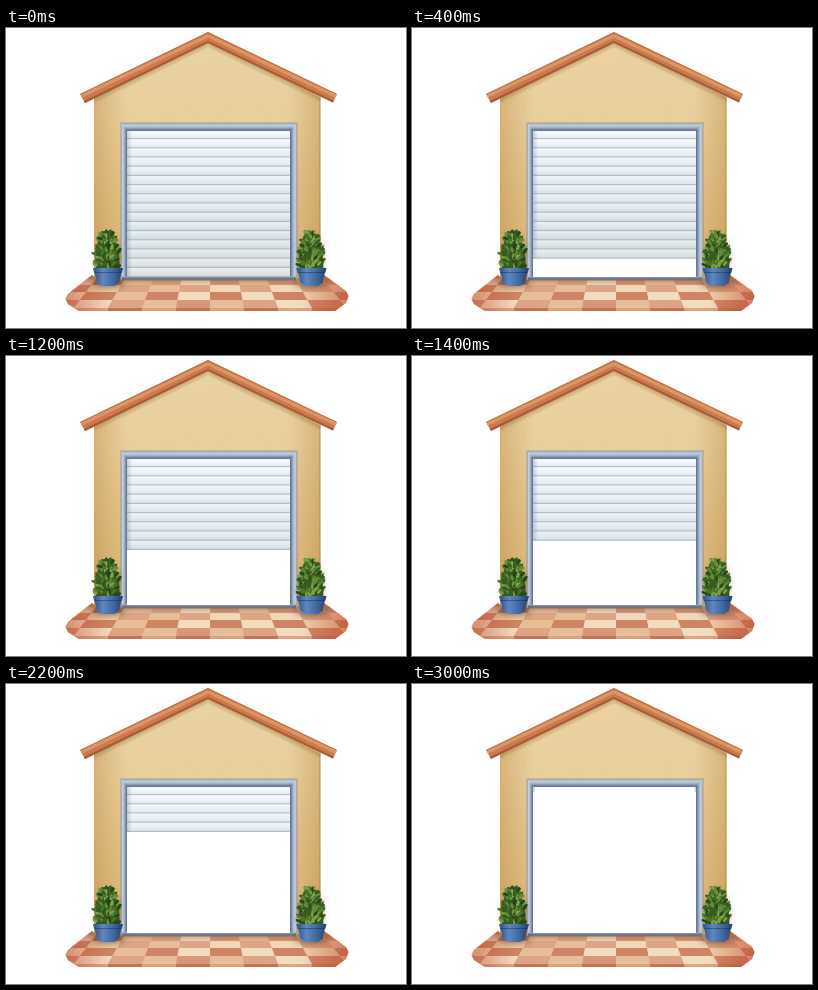
An HTML page with a canvas that plays this animation: 400 px wide and 300 px high, repeating every 3200 ms.

```html
<!DOCTYPE html>
<html lang="en">
<head>
<meta charset="utf-8">
<title>Garage door</title>
<style>
html, body { margin: 0; width: 100%; height: 100%; overflow: hidden; background: #fff; }
canvas { display: block; }
</style>
</head>
<body>
<canvas id="stage" width="400" height="300"></canvas>
<script>
const ctx = document.getElementById('stage').getContext('2d');
const LOOP = 3200, STEP = 200, SLAT = 9.2;
const DOOR = { x: 121, y: 102, w: 163, bottom: 249 };

let seed = 7;
const rnd = () => (seed = seed * 16807 % 2147483647) / 2147483647;
const pick = list => list[Math.floor(rnd() * list.length)];

function gradient(x0, y0, x1, y1, ...colors) {
  const g = ctx.createLinearGradient(x0, y0, x1, y1);
  colors.forEach((c, i) => g.addColorStop(i / (colors.length - 1), c));
  return g;
}

function rect(fill, x, y, w, h) {
  ctx.fillStyle = fill;
  ctx.fillRect(x, y, w, h);
}

function path(...p) {
  ctx.beginPath();
  for (let i = 0; i < p.length; i += 2) ctx.lineTo(p[i], p[i + 1]);
}

function poly(fill, ...p) {
  path(...p);
  ctx.closePath();
  ctx.fillStyle = fill;
  ctx.fill();
}

function stroke(color, width, ...p) {
  path(...p);
  ctx.strokeStyle = color;
  ctx.lineWidth = width;
  ctx.stroke();
}

function oval(fill, x, y, rx, ry) {
  ctx.fillStyle = fill;
  ctx.beginPath();
  ctx.ellipse(x, y, rx, ry, 0, 0, 7);
  ctx.fill();
}

function drawWall() {
  ctx.save();
  path(88, 69, 202, 12, 314.5, 69, 314.5, 252, 88, 252);
  ctx.clip();
  rect(gradient(0, 10, 0, 252, '#ead2a4', '#e9cf9d', '#e2c186', '#d9b373'), 88, 10, 227, 242);
  rect(gradient(88, 0, 122, 0, 'rgba(180,130,60,.38)', 'rgba(190,145,75,0)'), 88, 10, 34, 242);
  rect(gradient(315, 0, 281, 0, 'rgba(180,130,60,.38)', 'rgba(190,145,75,0)'), 281, 10, 34, 242);
  for (let i = 0; i < 2200; i++) {
    rect(rnd() < .5 ? 'rgba(145,100,45,.05)' : 'rgba(255,240,205,.08)',
      88 + rnd() * 227, 12 + rnd() * 240, 1 + rnd(), 1);
  }
  // Shade below the eaves
  for (let i = 0; i < 3; i++) {
    stroke('rgba(130,80,30,.10)', 4 + i * 3, 78, 75, 202, 14, 327, 75);
  }
  stroke('rgba(130,90,40,.45)', 1, 314, 69, 314, 252);
  ctx.restore();
}

function drawRoof() {
  const outline = [74, 66, 202, 4, 331, 66, 327, 74.5, 202, 15, 79, 75];
  poly('#cb7a4b', ...outline);
  ctx.save();
  path(...outline);
  ctx.clip();
  stroke('#dc9666', 3, 74, 69, 202, 8, 331, 69);
  stroke('#c57347', 1.2, 74, 66, 202, 4.5, 331, 66);
  stroke('#a95a36', 2.6, 78, 74.5, 202, 14.2, 328, 74.2);
  ctx.restore();
}

function drawFloor() {
  ctx.save();
  path(86, 247, 90, 251, 314, 251, 318, 247, 340, 263, 342.5, 268, 340, 275,
    329, 283, 73, 283, 62, 276, 59.5, 271, 62, 266);
  ctx.clip();
  rect('#e3b48f', 55, 246, 290, 40);
  ctx.filter = 'blur(0.6px)';
  const rows = [251, 257, 264, 272, 280];
  const warm = ['#cf8565', '#d9967a', '#dda584'];
  const pale = ['#f0d7b6', '#edcba8', '#f2dcc0', '#e8bd99'];
  const edge = (i, y) => 204 + i * (28.5 + (y - 251) * .19);
  for (let r = 0; r < 4; r++) {
    const y = rows[r], y2 = rows[r + 1];
    for (let i = -5; i < 5; i++) {
      poly(pick((i + r) & 1 ? pale : warm),
        edge(i, y), y, edge(i + 1, y), y, edge(i + 1, y2), y2, edge(i, y2), y2);
    }
  }
  for (let i = -5; i < 5; i++) {
    rect(i & 1 ? '#c67456' : '#dba27f', edge(i, 280), 280, 34, 4);
  }
  ctx.filter = 'none';
  rect(gradient(0, 247, 0, 258, 'rgba(110,60,30,.55)', 'rgba(110,60,30,0)'), 55, 247, 290, 11);
  rect(gradient(60, 0, 105, 0, 'rgba(185,65,40,.5)', 'rgba(190,70,40,0)'), 55, 246, 50, 38);
  rect(gradient(342, 0, 297, 0, 'rgba(185,65,40,.5)', 'rgba(190,70,40,0)'), 297, 246, 50, 38);
  ctx.restore();
}

function drawFrame() {
  // Light outer lip, dark inner recess
  const steel = ['#8f9eb5', '#c3cfdd', '#aebccf', '#7f90ad', '#5b6d8e'];
  rect('rgba(130,100,60,.22)', 114, 94, 178, 158);
  rect(gradient(115, 0, 121, 0, ...steel), 115, 95, 6, 157);
  rect(gradient(291, 0, 284, 0, ...steel), 284, 95, 7, 157);
  poly(gradient(0, 95, 0, 103, ...steel), 115, 95, 291, 95, 284, 103, 121, 103);
  rect(gradient(0, 248, 0, 253, '#b4bcc8', '#6c7686', '#85756f'), 116, 248.5, 174, 4);
}

function drawPlant(cx) {
  ctx.save();
  ctx.filter = 'blur(3px)';
  oval('rgba(60,40,20,.55)', cx, 255, 17, 4);
  oval('rgba(90,65,25,.4)', cx, 229, 12, 22);
  ctx.filter = 'blur(0.6px)';
  poly('#38591f', cx - 2, 202, cx + 6, 209, cx + 11, 222, cx + 12, 241, cx - 12, 241, cx - 13, 224, cx - 8, 208);
  const greens = ['#29451a', '#365c20', '#4a7529', '#628d37', '#7ea24a'];
  for (let i = 0; i < 110; i++) {
    const t = rnd(), half = 5 + 8 * Math.sin(Math.min(1, t * 1.5) * Math.PI / 2);
    const u = rnd() * 2 - 1;
    ctx.save();
    ctx.translate(cx - 1 + u * half, 204 + t * 35);
    ctx.rotate(u * 1.1 + rnd() - .5);
    oval(pick(greens), 0, 0, 1.4, 3);
    ctx.restore();
  }
  const blue = gradient(cx - 15, 0, cx + 15, 0, '#2f5089', '#5f86c0', '#42699f', '#263f6e');
  poly(blue, cx - 14, 242, cx + 14, 242, cx + 11, 255, cx + 6, 258, cx - 6, 258, cx - 11, 255);
  poly(blue, cx - 15, 240, cx + 15, 240, cx + 14, 244, cx - 14, 244);
  stroke('rgba(25,45,90,.5)', 1, cx - 14, 244.5, cx + 14, 244.5);
  ctx.restore();
}

function drawDoor(step) {
  const { x, y, w, bottom } = DOOR;
  rect('#fff', x, y + 1, w, bottom - y - 1);
  rect('#cbd3df', x, y + 1, 1.5, 5);
  rect('#cbd3df', x + w - 1.5, y + 1, 1.5, 5);
  const slats = step === 15 ? 0 : 16 - step;
  if (!slats) return;
  ctx.save();
  ctx.beginPath();
  ctx.rect(x, y + 1, w, Math.min(y + slats * SLAT, bottom) - y - 1);
  ctx.clip();
  rect(gradient(0, y, 0, bottom, '#f1f5fb', '#e6edf3', '#dde6eb', '#d6e1e5', '#dfe1e0'), x, y, w, bottom - y);
  for (let i = 0; i < slats; i++) {
    const top = y + i * SLAT;
    rect(gradient(0, top, 0, top + SLAT, 'rgba(255,255,255,.5)', 'rgba(255,255,255,.1)', 'rgba(150,172,188,.22)'),
      x, top, w, SLAT);
    rect('rgba(145,163,180,.55)', x, top + SLAT - 1.2, w, 1.2);
  }
  rect(gradient(x, 0, x + 5, 0, 'rgba(110,130,155,.35)', 'rgba(110,130,155,0)'), x, y, 5, 148);
  ctx.restore();
}

rect('#fff', 0, 0, 400, 300);
drawWall();
drawRoof();
drawFloor();
drawFrame();
drawPlant(102);
drawPlant(305.5);

// The scenery stays on the canvas; only the opening is redrawn.
const start = performance.now();
function tick(now) {
  const time = Math.max(0, now - start) % LOOP;
  drawDoor(Math.floor(time / STEP));
  requestAnimationFrame(tick);
}
drawDoor(0);
requestAnimationFrame(tick);
</script>
</body>
</html>
```
